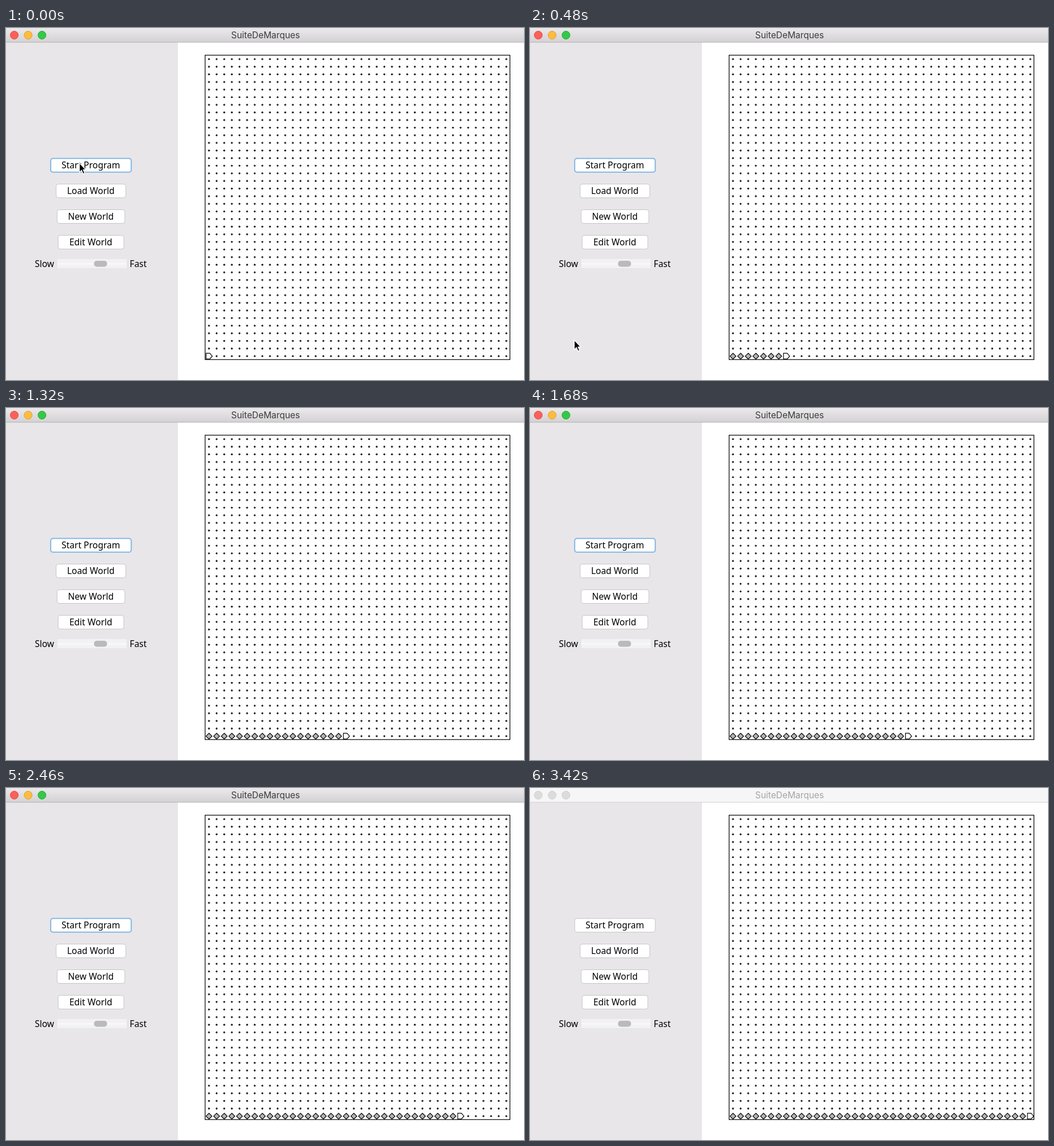
Write an HTML page that moves like this. It is 907 px wide and 617 px high and loops after 3.48 s.

```html
<!DOCTYPE html>
<html lang="fr">
<head>
<meta charset="utf-8">
<style>
html, body { margin: 0; width: 100%; height: 100%; overflow: hidden; background: #fff; }
svg { display: block; width: 100%; height: 100%; }
text { font: 500 15.5px "Noto Sans", "Open Sans", sans-serif; text-anchor: middle; }
.title { font: 400 15.4px Inter, Roboto, sans-serif; fill: #3c3c3c; }
.button { fill: #fff; stroke: #c6c4c8; }
.focus { stroke: #78b1e2; stroke-width: 1.8; }
.ink { stroke: #000; stroke-width: 1.2; }
.inactive .title { fill: #a4a4a4; }
.inactive .bar { fill: #f6f6f6; }
.inactive .edge { fill: #d2d2d2; }
.inactive .light { fill: #dcdcdc; stroke: #cfcfcf; }
.inactive .focus { stroke: #c6c4c8; stroke-width: 1; }
</style>
</head>
<body>
<svg id="stage" viewBox="0 0 907 617" preserveAspectRatio="none">
  <defs>
    <linearGradient id="metal" x2="0" y2="1">
      <stop stop-color="#ebe9eb"/><stop offset="1" stop-color="#d3d1d3"/>
    </linearGradient>
  </defs>
  <rect width="907" height="617" fill="#fff"/>
  <rect y="25" width="301" height="592" fill="#e8e6e9"/>
  <rect class="bar" width="907" height="25" fill="url(#metal)"/>
  <rect class="edge" y="24.5" width="907" height="1" fill="#b4b2b4"/>
  <circle class="light" cx="14.5" cy="12.5" r="7" fill="#fc605b" stroke="#e2463f"/>
  <circle class="light" cx="38.8" cy="12.5" r="7" fill="#fdbc40" stroke="#dfa023"/>
  <circle class="light" cx="63" cy="12.5" r="7" fill="#34c84a" stroke="#1dad2b"/>
  <text class="title" x="454.5" y="18">SuiteDeMarques</text>

  <g id="buttons"></g>
  <text x="67.3" y="419">Slow</text>
  <text x="231.5" y="419">Fast</text>
  <rect x="90" y="405" width="121" height="16" fill="#f2f1f3"/>
  <rect x="90" y="412" width="121" height="3" fill="#f8f8f8"/>
  <rect x="154" y="408" width="23" height="10.5" rx="5" fill="#bababa"/>

  <rect class="ink" x="348.6" y="47.6" width="533.8" height="533.6" fill="none"/>
  <path id="dots" stroke="#000" stroke-width="1.3"/>
  <path id="markers" class="ink" fill="#b4b4b4"/>
  <path id="robot" class="ink" fill="#fff" d="M-5 -5H1.5L5.8 0L1.5 5H-5Z"/>
  <path id="cursor" stroke="#fff" stroke-width="1.3"
        d="M0 0V16.5L3.8 13L6.6 19.2L9.4 18L6.7 12H11.4Z"/>
</svg>
<script>
const LOOP = 3480, TICK = 60, CELLS = 40, PITCH = 13.35;
const LEFT = 355.4, BOTTOM = 575.2;
// Times at which the robot waits one tick instead of moving on.
const WAITS = [120, 540, 960, 1260, 1560, 1860, 2160, 2400, 2760];
const $ = id => document.getElementById(id);
const cellX = i => LEFT + i * PITCH;

$("buttons").innerHTML = [
  ["Start Program", 141, "button focus"],
  ["Load World", 122, "button"],
  ["New World", 118.5, "button"],
  ["Edit World", 115, "button"]
].map(([label, w, style], i) => {
  const y = 228.7 + 44.9 * i;
  return `<rect class="${style}" x="${148.8 - w / 2}" y="${y}" width="${w}" height="24" rx="4"/>` +
    `<text x="148.5" y="${y + 17.3}">${label}</text>`;
}).join("");

let dots = "";
for (let row = 0; row < CELLS; row++)
  for (let col = 0; col < CELLS; col++) {
    const x = cellX(col), y = BOTTOM - row * PITCH;
    dots += `M${x - 1.8} ${y}h3.6M${x} ${y - 1.8}v3.6`;
  }
$("dots").setAttribute("d", dots);

function draw(time) {
  const t = Math.floor(time / TICK) * TICK;
  const moved = Math.min(t, 2880);
  const cell = moved / TICK - WAITS.filter(w => w <= moved).length;

  let path = "";
  for (let i = 0; i < cell; i++) path += `M${cellX(i)} ${BOTTOM - 5.2}l5.2 5.2l-5.2 5.2l-5.2 -5.2Z`;
  $("markers").setAttribute("d", path);
  $("robot").setAttribute("transform", `translate(${cellX(cell)} ${BOTTOM})`);

  const u = Math.min(t / 660, 1), ease = u * u * (3 - 2 * u);
  const x = 128.5 - 51 * Math.min(ease / 0.817, 1);
  $("cursor").setAttribute("transform", `translate(${x} ${236.5 + 380 * ease})`);
  $("cursor").style.display = u < 1 ? "" : "none";

  $("stage").classList.toggle("inactive", t >= 3420);
}

const start = performance.now();
function frame() {
  draw((performance.now() - start) % LOOP);
  requestAnimationFrame(frame);
}
frame();
</script>
</body>
</html>
```
